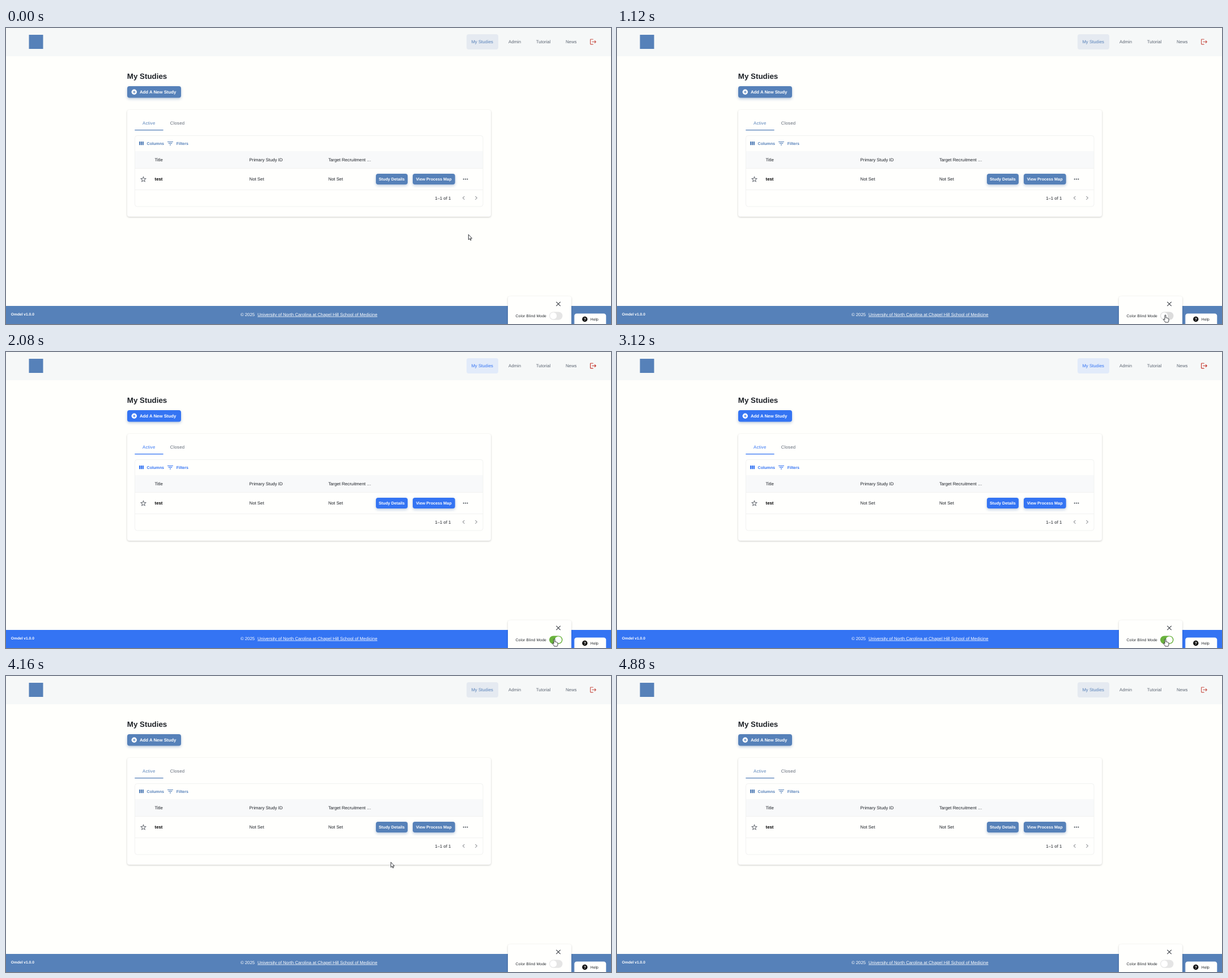
Write an HTML page that moves like this. It is 1068x524 px and loops after 5.36 s.

```html
<!DOCTYPE html>
<html lang="en">
<head>
<meta charset="utf-8">
<title>My Studies</title>
<style>
html, body { margin: 0; width: 100%; height: 100%; overflow: hidden; background: #fffffc; }
svg {
  --k: 0%; --bar: #5681b9;
  --main: color-mix(in srgb, #3474f3 var(--k), #5681b9);
  --pill: color-mix(in srgb, #e2ebfa var(--k), #e5eaf1);
  display: block; width: 1068px; height: 524px;
  font: 7.79px "Liberation Sans", Arial, sans-serif;
  text-rendering: geometricPrecision;
}
.main { fill: var(--main); }
.bold { font-weight: bold; }
.s13 { font-size: 7.23px; }
.s12 { font-size: 6.675px; }
.nav { fill: #5d6673; }
.dark { fill: #1d2127; }
.white { fill: #fff; }
.tab { letter-spacing: .22px; }
.line { fill: none; stroke: #f1f2f1; }
.card { fill: #fffffd; filter: drop-shadow(0 1px 1.5px #0003); }
.btn { filter: drop-shadow(0 2px 2.5px rgb(70 110 170 / .38)); }
.cursor { fill: #fff; stroke: #22252a; stroke-width: .9; stroke-linejoin: round; }
</style>
</head>
<body>
<svg viewBox="0 0 1068 524">
  <rect width="1068" height="524" fill="#fffffc"/>

  <!-- header -->
  <rect width="1068" height="50" fill="#f6f8f8"/>
  <rect x="40.5" y="12" width="25" height="25" fill="#5681b9"/>
  <rect x="813" y="11" width="56" height="27" rx="4" fill="var(--pill)"/>
  <text x="821.4" y="27.3" class="main">My Studies</text>
  <g class="nav">
    <text x="887" y="27.3">Admin</text>
    <text x="935.7" y="27.3">Tutorial</text>
    <text x="988" y="27.3">News</text>
  </g>
  <path id="exit" transform="translate(1029.9 17.8) scale(.556)" d="M17 7l-1.41 1.41L18.17 11H8v2h10.17l-2.58 2.58L17 17l5-5zM4 5h8V3H4c-1.1 0-2 .9-2 2v14c0 1.1.9 2 2 2h8v-2H4V5z"/>

  <!-- title and main button -->
  <text x="213.8" y="90.4" class="bold dark" font-size="13.35">My Studies</text>
  <rect x="214" y="103" width="95" height="20.5" rx="4" class="main btn"/>
  <circle cx="226.3" cy="113.3" r="4.7" class="white"/>
  <path d="M223.9 113.3h4.8M226.3 110.9v4.8" stroke="var(--main)" stroke-width="1.1"/>
  <text x="236" y="116.1" class="bold white">Add A New Study</text>

  <!-- study table -->
  <rect x="214" y="145" width="642" height="189" rx="4" class="card"/>
  <text x="241" y="170.9" class="main tab">Active</text>
  <text x="289.7" y="170.9" class="nav tab">Closed</text>
  <rect x="227.3" y="180" width="50.3" height="1.3" class="main"/>
  <rect x="228" y="218" width="614" height="30.5" fill="#f8f9fa"/>
  <path class="line" d="M228 248.5h614M228 286.5h614"/>
  <rect x="227.5" y="190.5" width="614.5" height="125.5" rx="4" class="line"/>
  <g class="main bold" font-size="7.1">
    <path d="M235 201h2.2v6.2h-2.2zM237.9 201h2.2v6.2h-2.2zM240.8 201h2.2v6.2h-2.2z"/>
    <path d="M285 200.9h10v1.2h-10zM286.7 203.6h6.6v1.2h-6.6zM288.9 206.3h2.2v1.2h-2.2z"/>
    <text x="248.6" y="206.5">Columns</text>
    <text x="300.7" y="206.5">Filters</text>
  </g>
  <g class="dark">
    <text x="262.4" y="235.9">Title</text>
    <text x="429.6" y="235.9">Primary Study ID</text>
    <text x="568.9" y="235.9">Target Recruitment …</text>
    <text x="262.6" y="270.4" class="bold" fill="#000">test</text>
    <text x="429.6" y="270.4">Not Set</text>
    <text x="568.9" y="270.4">Not Set</text>
    <text x="757.2" y="303.9">1–1 of 1</text>
  </g>
  <path fill="#555b64" transform="translate(235.8 261.1) scale(.556)" d="M22 9.24l-7.19-.62L12 2 9.19 8.63 2 9.24l5.46 4.73L5.82 21 12 17.27 18.18 21l-1.63-7.03L22 9.24zM12 15.4l-3.76 2.27 1-4.28-3.32-2.88 4.38-.38L12 6.1l1.71 4.04 4.38.38-3.32 2.88 1 4.28L12 15.4z"/>
  <rect x="653" y="258" width="56" height="19" rx="4" class="main btn"/>
  <rect x="718" y="258" width="74.7" height="19" rx="4" class="main btn"/>
  <g class="bold white s13">
    <text x="658" y="270.1">Study Details</text>
    <text x="723.7" y="270.1">View Process Map</text>
  </g>
  <g fill="#555b64">
    <circle cx="807.8" cy="267.6" r="1.15"/>
    <circle cx="811.1" cy="267.6" r="1.15"/>
    <circle cx="814.4" cy="267.6" r="1.15"/>
  </g>
  <path d="M809.4 297.8l-3 3 3 3M828.4 297.8l3 3-3 3" fill="none" stroke="#989a9d" stroke-width="1.1"/>

  <!-- footer -->
  <rect y="492" width="1068" height="32" fill="var(--bar)"/>
  <text x="8.8" y="508.5" class="bold white s12">Omdel v1.0.0</text>
  <g class="white">
    <text x="413.9" y="509.7">© 2025</text>
    <text x="444" y="509.7" text-decoration="underline">University of North Carolina at Chapel Hill School of Medicine</text>
  </g>

  <!-- color mode panel -->
  <path d="M886 530v-51q0-4 4-4h104q4 0 4 4v51z" class="card"/>
  <path d="M971.3 484.8l7.4 7.4m0-7.4l-7.4 7.4" stroke="#42464c" stroke-width="1.2"/>
  <text x="899.6" y="512" class="dark s12" letter-spacing=".21">Color Blind Mode</text>
  <rect id="track" x="959" y="502.4" width="23.5" height="14.4" rx="7.2"/>
  <circle id="thumb" cy="509.6" r="6" class="white"/>

  <!-- help -->
  <path d="M1003.3 530v-20q0-4.5 4.5-4.5h47q4.5 0 4.5 4.5v20z" fill="#fffffd"/>
  <circle cx="1021.8" cy="515.5" r="4.7" fill="#111"/>
  <text x="1021.8" y="518.1" class="bold white" font-size="7" text-anchor="middle">?</text>
  <text x="1031.8" y="517.6" class="dark s12" letter-spacing=".1">Help</text>

  <g id="cursor" class="cursor">
    <path id="arrow" d="M.4.6V9.8L2.5 7.9 3.9 10.9 5.2 10.3 3.8 7.3H6.6Z"/>
    <path id="hand" d="M-1 1Q-1 0 0 0T1 1V5Q2.6 4.4 2.9 5.6 4.2 5 4.6 6.2 6 6 6 7.4V10Q6 11.5 5 13H0Q-1.6 10.5-3.7 7.8-3.4 6.4-1 8.2Z"/>
  </g>
</svg>
<script>
const LOOP = 5360, STEP = 80, ON = 1440, OFF = 3760;
const $ = id => document.getElementById(id);
const svg = document.querySelector('svg');

// time, position, velocity per step
const path = [
  [0, 816, 365, 0, 0],
  [1120, 968, 508, 0, 0],
  [3680, 968, 508, 0, 0],
  [3760, 967, 507, 0, 0],
  [4160, 679, 329, -42, -88],
  [4240, 637, 242, -42, -80],
  [4800, 477, 2, 0, 0]
];

const hermite = (a, b, va, vb, u) =>
  a + (b - a) * u * u * (3 - 2 * u) + u * (1 - u) * (va * (1 - u) - vb * u);

function cursorAt(t) {
  const i = Math.max(1, path.findIndex(p => t <= p[0]));
  const a = path[i - 1], b = path[i];
  const span = b[0] - a[0], n = span / STEP, u = (t - a[0]) / span;
  return [1, 2].map(j => hermite(a[j], b[j], a[j + 2] * n, b[j + 2] * n, u));
}

function draw(now) {
  const t = Math.floor(now % LOOP / STEP) * STEP;
  const on = t >= ON && t < OFF;
  const p = on ? Math.min(1, (t - ON + STEP) / 480) : 0;
  const k = 1 - (1 - p) ** 5;
  svg.style.setProperty('--k', k * 100 + '%');
  svg.style.setProperty('--bar', on ? '#3474f3' : '#5681b9');
  $('exit').style.fill = on ? '#c5342b' : '#c9544a';

  const shown = t <= 4800;
  const [x, y] = shown ? cursorAt(t) : [0, 0];
  const hover = shown && x > 959 && x < 983 && y > 501;
  $('cursor').style.display = shown ? '' : 'none';
  $('cursor').setAttribute('transform', `translate(${x} ${y})`);
  $('arrow').style.display = hover ? 'none' : '';
  $('hand').style.display = hover ? '' : 'none';
  $('track').style.fill = `color-mix(in srgb, #69b23c ${p * 100}%, ${hover ? '#dcdcdc' : '#e5e5e5'})`;
  $('thumb').setAttribute('cx', 966.2 + 8.8 * k);
}

const start = performance.now();
(function tick() {
  draw(performance.now() - start);
  requestAnimationFrame(tick);
})();
</script>
</body>
</html>
```
